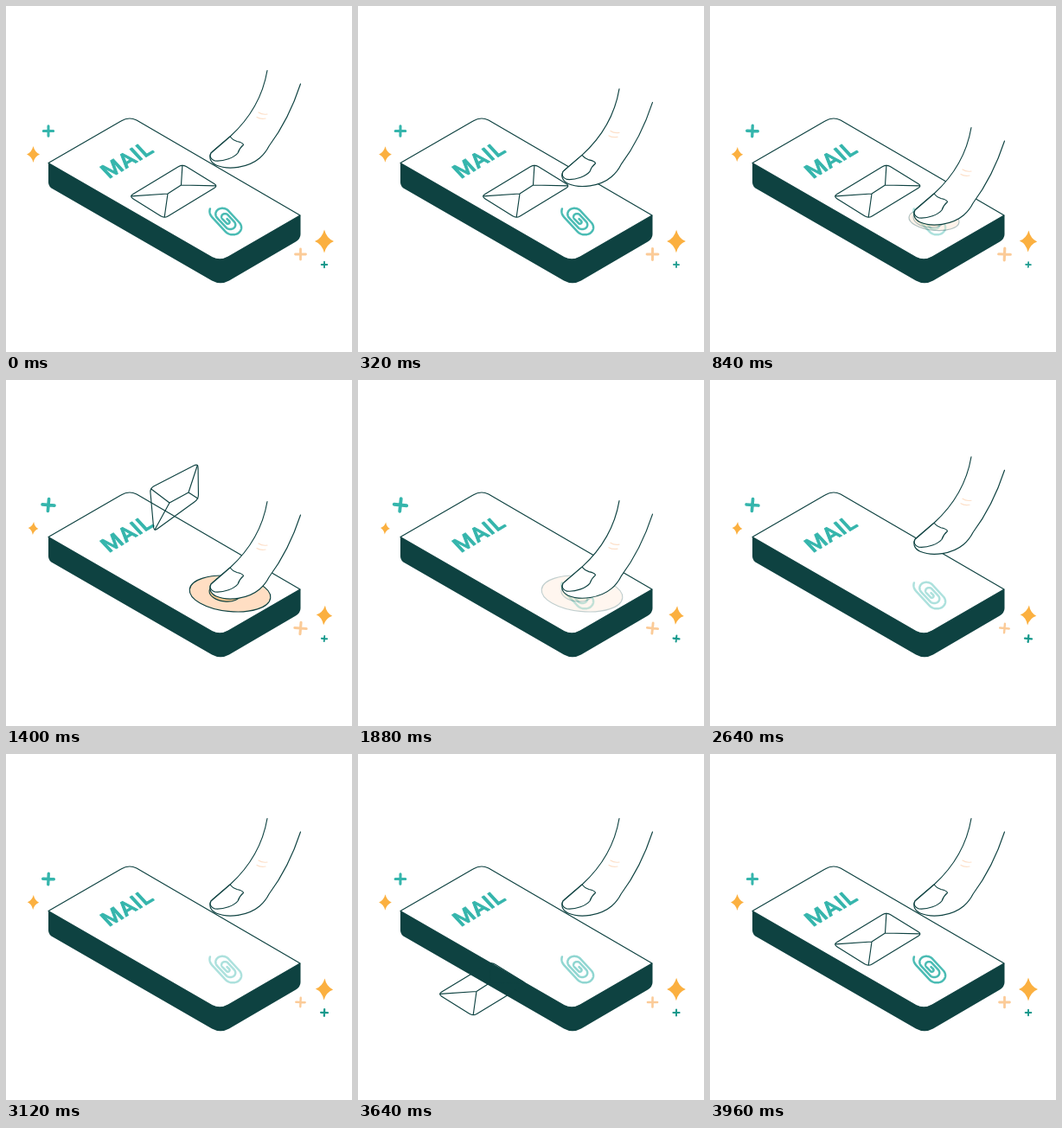
These frames come from a looping animation (400x400 px, 4 s). An HTML page:

```html
<!DOCTYPE html>
<html lang="en">
<head>
<meta charset="utf-8">
<title>Mail button</title>
<style>
  html, body { margin: 0; width: 100%; height: 100%; overflow: hidden; background: #fff; }
  svg { display: block; width: 100%; height: 100%; }
  .line { fill: #fff; stroke: #0e4241; stroke-width: 1.15; stroke-linejoin: round; stroke-linecap: round; }
  .open { fill: none; }
  .plus { fill: none; stroke-linecap: round; }
  text { font: 500 25px Roboto, Inter, sans-serif; letter-spacing: .7px; fill: #35b5ac; stroke: #35b5ac; stroke-width: .9; stroke-linejoin: round; }
</style>
</head>
<body>
<svg viewBox="0 0 400 400">
  <path fill="#0e4241" d="M49 181V204Q49 209 55 212L238 317.500Q248 323 258 317.500L335 272.500Q340.500 269 340.500 264V242L248 240Z"/>
  <path class="line" d="M49 181.500L133 133Q142 127.500 151 132L340 242L257 290Q247.500 295.500 238 290.500Z"/>
  <text transform="matrix(.86 -.51 .68 .735 119 200)">MAIL</text>
  <path id="print" fill="none" stroke="#4bbcb4" stroke-width="2.500" stroke-linecap="round" stroke-linejoin="round"/>
  <g id="ripple">
    <ellipse id="wave" class="line" transform="translate(259 247) rotate(6)" style="fill:#ffdec3"/>
    <ellipse class="line" transform="translate(253.500 245.500) rotate(6)" rx="18.500" ry="10.500" style="fill:#fbc88f"/>
  </g>
  <g id="envelope">
    <path id="paper" class="line open"/>
    <path id="folds" class="line open"/>
  </g>
  <g id="finger">
    <path class="line" d="M302 74.500C297 104 282 130 259 151L239 168C233 173 236 181 243 184C257 190 280 187 293 176Q300 170 304 162C319 142 332 116 340.500 90"/>
    <path class="line" d="M259 151Q262 155 267 156.500Q274 158 274.500 160.500Q270 164 268 170C264 175 252 180 241.500 179Q234 176 237 170Z"/>
    <path class="open" fill="none" stroke="#fde0c9" stroke-width="1.200" stroke-linecap="round" d="M292 123Q296 126 302 125M290 128.500Q294 131 300 130"/>
  </g>
  <g id="sparks"></g>
</svg>
<script>
const LOOP = 4000, STEP = 40;
const $ = id => document.getElementById(id);
const clamp = x => Math.min(1, Math.max(0, x));
const span = (t, a, b) => clamp((t - a) / (b - a));
const smooth = p => p * p * (3 - 2 * p);
const ease = (t, a, b) => smooth(span(t, a, b));
const mix = (a, b, p) => a + (b - a) * p;

// Left, top, right and bottom corners, then the two ends of the fold.
const FLAT = [[142.5, 220], [204, 183], [245, 208], [183, 245.5], [187, 217], [202.5, 207]];
const UPRIGHT = [[166.5, 203], [222, 174.5], [222.5, 215.5], [171, 253], [189, 220], [211, 208]];

// Centre, radius, colour, then size change at mid-loop, sideways size swing and tilt.
const SPARKS = [
  { x: 31.5, y: 171.5, rx: 7.5, ry: 9.5, color: "#fbb040", grow: -.27, swing: 0, tilt: 6 },
  { x: 368, y: 272, rx: 11, ry: 13.5, color: "#fbb040", grow: -.2, swing: 0, tilt: 6 },
  { x: 49, y: 144.5, r: 5.7, w: 3, color: "#35b5ac", grow: .28, swing: 0, tilt: 6 },
  { x: 340.5, y: 287, r: 6, w: 2.8, color: "#fbcb98", grow: 0, swing: .14, tilt: 6 },
  { x: 368, y: 299, r: 3.3, w: 1.9, color: "#17998c", grow: .1, swing: -.15, tilt: 6 }
];

function makeSpark(s) {
  const path = document.createElementNS("http://www.w3.org/2000/svg", "path");
  if (s.rx) {
    const { rx, ry } = s, k = .24;
    path.setAttribute("d", `M0 ${-ry}Q${rx * k} ${-ry * k} ${rx} 0Q${rx * k} ${ry * k} 0 ${ry}Q${-rx * k} ${ry * k} ${-rx} 0Q${-rx * k} ${-ry * k} 0 ${-ry}Z`);
    path.setAttribute("fill", s.color);
  } else {
    path.setAttribute("class", "plus");
    path.setAttribute("d", `M${-s.r} 0H${s.r}M0 ${-s.r}V${s.r}`);
    path.setAttribute("stroke", s.color);
    path.setAttribute("stroke-width", s.w);
  }
  $("sparks").append(path);
  s.path = path;
}

// A spiral of stadium-shaped turns, laid on the same slanted plane as the text.
function spiral() {
  const turns = 2.7, end = 4 / 3 * Math.PI, points = [];
  for (let i = 0; i <= 160; i++) {
    const p = i / 160, a = end - (1 - p) * turns * 2 * Math.PI;
    const r = mix(1, 11.2, p);
    const u = r * Math.cos(a);
    const v = r * Math.sin(a) + Math.sign(Math.sin(a)) * mix(1, 12, p);
    points.push(`${(255.5 + .86 * u + .68 * v).toFixed(2)} ${(247.5 - .51 * u + .735 * v).toFixed(2)}`);
  }
  return "M" + points.join("L");
}

function roundedPath(corners, radius) {
  const toward = (a, b) => {
    const k = radius / Math.hypot(b[0] - a[0], b[1] - a[1]);
    return [mix(a[0], b[0], k), mix(a[1], b[1], k)];
  };
  return corners.map((c, i) => {
    const before = corners[(i + 3) % 4], after = corners[(i + 1) % 4];
    return `${i ? "L" : "M"}${toward(c, before)}Q${c} ${toward(c, after)}`;
  }).join("") + "Z";
}

function drawEnvelope(t) {
  const returning = t >= 3360;
  const rise = returning ? 0 : Math.max(0, (t - 920) / 480);
  const turn = returning ? 0 : ease(t, 920, 1400);
  const pts = FLAT.map((p, i) => p.map((v, k) => mix(v, UPRIGHT[i][k], turn)));
  const [left, top, right, bottom, a, b] = pts;
  // Folds stop at the rounded corners.
  const near = (corner, end) => corner.map((v, k) => mix(v, end[k], .06));
  $("paper").setAttribute("d", roundedPath([left, top, right, bottom], 5));
  $("folds").setAttribute("d", `M${near(left, a)}L${a}L${b}L${near(top, b)}M${a}L${near(bottom, a)}M${b}L${near(right, b)}`);
  const away = returning ? (1 - span(t, 3360, 3920)) ** 2 : 0;
  $("envelope").setAttribute("transform", `translate(${-200 * away} ${230 * away - 78 * rise ** 3})`);
  $("envelope").style.display = t > 1680 && !returning ? "none" : "";
}

function draw(t) {
  const press = 66 * (ease(t, 0, 840) - ease(t, 1800, 3000));
  $("finger").setAttribute("transform", `translate(0 ${press})`);
  $("print").style.opacity = 1 - .55 * (ease(t, 600, 840) - ease(t, 3480, 3920));

  const grow = span(t, 680, 1240);
  $("wave").setAttribute("rx", mix(22, 47, grow));
  $("wave").setAttribute("ry", mix(9, 20.5, grow));
  $("ripple").style.opacity = span(t, 720, 1080) * (1 - span(t, 1640, 1960));

  drawEnvelope(t);

  const turn = t / LOOP * 2 * Math.PI;
  const pulse = (1 - Math.cos(turn)) / 2;
  for (const s of SPARKS) {
    const size = 1 + s.grow * pulse + s.swing * Math.sin(turn);
    s.path.setAttribute("transform", `translate(${s.x} ${s.y}) rotate(${s.tilt * pulse}) scale(${size})`);
  }
}

SPARKS.forEach(makeSpark);
$("print").setAttribute("d", spiral());
const start = performance.now();
function tick() {
  const t = (performance.now() - start) % LOOP;
  draw(Math.floor(t / STEP) * STEP);
  requestAnimationFrame(tick);
}
tick();
</script>
</body>
</html>
```
